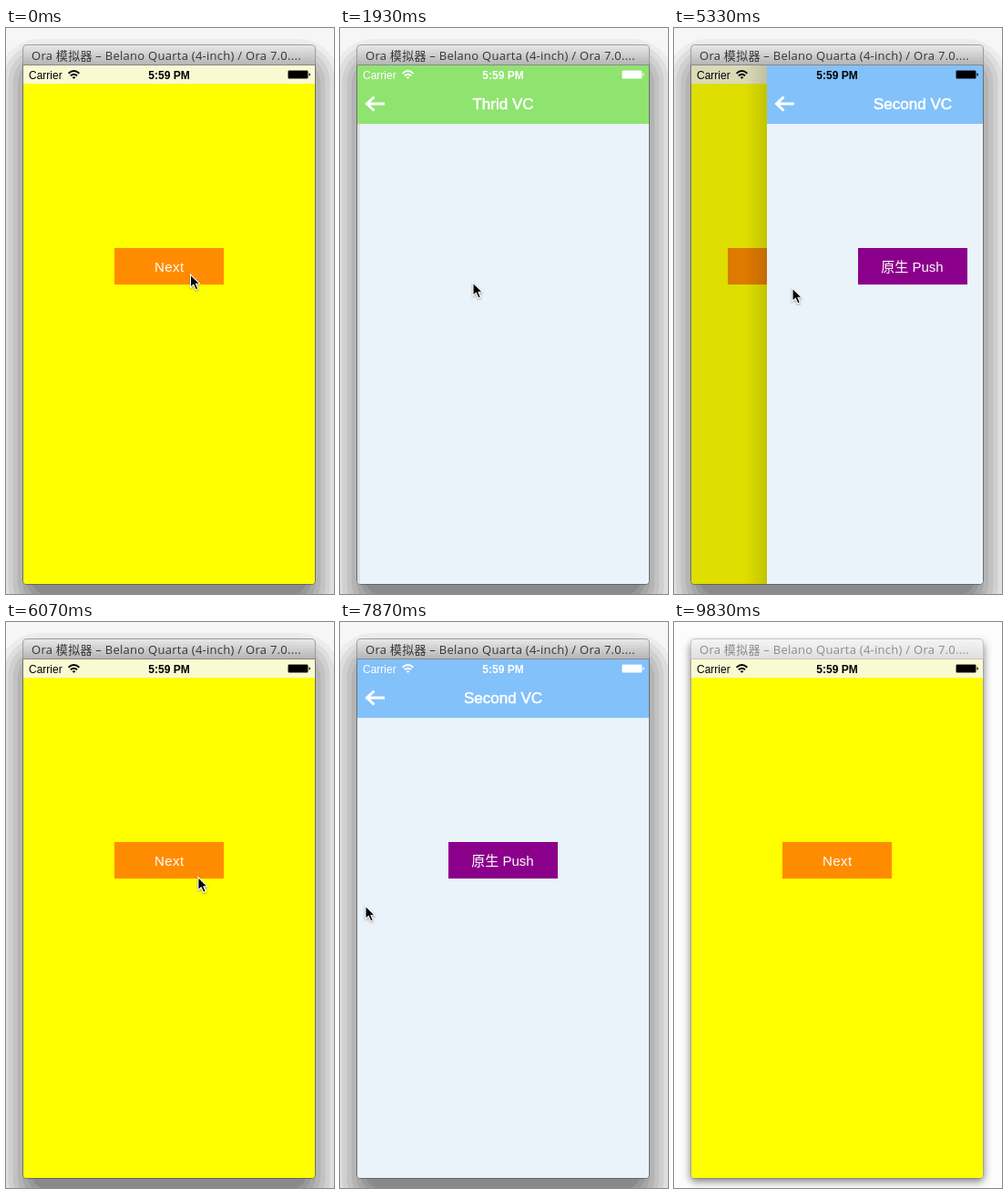
An HTML page for the animation above (9920 ms loop, 360x620 px).

```html
<!DOCTYPE html>
<html lang="zh">
<head>
<meta charset="utf-8">
<title>Navigation demo</title>
<style>
  html, body { margin: 0; width: 100%; height: 100%; overflow: hidden; background: #f6f6f6; }
  svg { display: block; width: 360px; height: 620px; }
  text { font-family: "Liberation Sans", Arial, "Noto Sans CJK SC", "Noto Sans CJK", sans-serif; white-space: pre; }
  .mid { text-anchor: middle; }
  .caption { font: 13px "Open Sans", "Noto Sans", "Noto Sans CJK SC", "Noto Sans CJK", sans-serif; letter-spacing: .27px; fill: #363636; }
  .button { font-size: 15px; fill: #fff; }
  .title { font-size: 17px; fill: #fff; stroke: #fff; stroke-width: .55px; }
  .status { font-size: 12px; fill: currentColor; }
  #soft { display: none; }
  .idle #soft { display: inline; }
  .idle #rings { display: none; }
  .idle .caption { fill: #8c8c8c; }
  .idle #chrome { fill: url(#offFill); stroke: #bdbdbd; }
  .idle #outline { stroke-opacity: .2; }
</style>
</head>
<body>
<svg id="stage" viewBox="0 0 360 620">
  <defs>
    <linearGradient id="onFill" x2="0" y2="1">
      <stop stop-color="#e9e9e9"/><stop offset="1" stop-color="#b3b3b3"/>
    </linearGradient>
    <linearGradient id="offFill" x2="0" y2="1">
      <stop stop-color="#f5f5f5"/><stop offset="1" stop-color="#dedede"/>
    </linearGradient>
    <linearGradient id="edge">
      <stop stop-opacity="0"/><stop offset="1" stop-opacity=".16"/>
    </linearGradient>
    <clipPath id="screen">
      <path d="M19 41H339V606Q339 609 336 609H22Q19 609 19 606Z"/>
    </clipPath>
    <filter id="blur" x="-10%" y="-10%" width="120%" height="120%">
      <feGaussianBlur stdDeviation="4.5"/>
    </filter>
  </defs>

  <rect id="backdrop" width="360" height="620"/>
  <g id="rings"></g>
  <rect id="soft" x="18" y="23" width="322" height="590" rx="5" fill-opacity=".5" filter="url(#blur)"/>

  <!-- window frame -->
  <path id="chrome" d="M18.5 41V23Q18.5 18.5 23 18.5H335Q339.5 18.5 339.5 23V41Z" fill="url(#onFill)" stroke="#8e8e8e" stroke-width=".8"/>
  <path id="outline" d="M18.5 41V605.5Q18.5 609.5 22.5 609.5H335.5Q339.5 609.5 339.5 605.5V41Z" fill="none" stroke="#555" stroke-opacity=".7"/>
  <text class="caption" x="28" y="35">Ora 模拟器 – Belano Quarta (4-inch) / Ora 7.0....</text>

  <g clip-path="url(#screen)">
    <g id="home">
      <rect x="19" y="41" width="320" height="568" fill="#ff0"/>
      <rect x="19" y="41" width="320" height="20" fill="#fafad2"/>
      <rect x="119" y="241" width="120" height="40" fill="#ff8c00"/>
      <text class="button mid" x="179.3" y="266.5" letter-spacing=".5">Next</text>
    </g>
    <rect id="homeDim" x="19" y="41" width="320" height="568"/>

    <g id="page">
      <rect id="pageEdge" x="-5" y="41" width="24" height="568" fill="url(#edge)"/>
      <g id="second">
        <rect x="19" y="105" width="320" height="504" fill="#eaf2fa"/>
        <rect x="119" y="241" width="120" height="40" fill="#8b008b"/>
        <text class="button mid" x="178.5" y="266.5">原生 Push</text>
      </g>
      <rect id="secondDim" x="19" y="105" width="320" height="504"/>
      <g id="third">
        <rect x="19" y="105" width="320" height="504" fill="#eaf2fa"/>
      </g>
      <rect x="19" y="41" width="320" height="64" fill="#82c1fa"/>
      <rect id="green" x="19" y="41" width="320" height="64" fill="#8fe36f"/>
      <path d="M49 83H30M37.5 75.5L29.5 83L37.5 90.5" fill="none" stroke="#fff" stroke-width="3"/>
      <text id="titleB" class="title mid" x="179" y="89">Second VC</text>
      <text id="titleC" class="title mid" x="179" y="89">Thrid VC</text>
    </g>

    <g id="status">
      <text class="status" x="25" y="55.5">Carrier</text>
      <g fill="none" stroke="currentColor" stroke-width="1.9">
        <path d="M68.6 49.7Q74.5 44.3 80.4 49.7M70.9 52.3Q74.5 49 78.1 52.3"/>
        <path d="M74.5 55.8L72.6 53.9Q74.5 52.4 76.4 53.9Z" fill="currentColor" stroke="none"/>
      </g>
      <text class="status mid" x="179" y="55.5" font-weight="bold">5:59 PM</text>
      <rect x="309.5" y="46.5" width="22" height="9" rx="1.5" fill="none" stroke="currentColor" stroke-opacity=".45"/>
      <rect x="310" y="47" width="21" height="8" rx=".6" fill="currentColor"/>
      <path d="M332.5 49.2Q334 49.7 334 51T332.5 52.8Z" fill="currentColor"/>
    </g>
  </g>

  <path id="cursor" d="M0 0V14.2L3.3 11.2L5.8 16.8L8.4 15.7L6 10.2H10.2Z" stroke="#fff" stroke-width="1.1" style="filter:drop-shadow(0 1px 1px rgba(0,0,0,.35))"/>
</svg>

<script>
const LOOP = 9920;
const WIDTH = 320;
const STEP = 148;
const PUSH = 590;
const FINISH = 220;
const PARALLAX = -.253;
const $ = id => document.getElementById(id);

// Stretches of time in which the picture updates about every STEP ms.
const runs = [
  [590, 1180], [1480, 2380], [2530, 3560], [3710, 4740],
  [4890, 5920], [6070, 6970], [7120, 8020], [8170, 9070]
];
const HIDE_POINTER = 9220;
const LOSE_FOCUS = 9830;

// Pointer stops: time, x, y.
const stops = [
  [0, 202.5, 270], [1400, 176, 264], [1930, 146, 279], [2380, 13, 284], [2530, 13, 284],
  [3340, 266, 264], [3860, 171, 259], [4400, 34, 77], [4890, 47, 278], [5330, 130, 285],
  [5700, 222, 286], [6500, 198, 272], [6820, 198, 290], [7570, 20, 310], [7870, 28, 311],
  [8470, 228, 312], [9070, 306, 593]
];

// A page is pushed in, later grabbed by the pointer, dragged and let go.
const pageVisits = [
  { push: 590, drag: 4890, grabX: 47, release: 5700 },
  { push: 6530, drag: 7800, grabX: 28, release: 8480 }
];
const thirdVisits = [{ push: 1410, drag: 2530, grabX: 19, release: 3340 }];

// Share of the way still to go in an ease-out.
const left = x => (1 - Math.min(1, x)) ** 2.2;

function pointer(t) {
  const i = stops.findIndex(stop => stop[0] > t);
  if (i < 0) return stops[stops.length - 1].slice(1);
  const [t0, x0, y0] = stops[i - 1], [t1, x1, y1] = stops[i];
  const k = (t - t0) / (t1 - t0);
  return [x0 + (x1 - x0) * k, y0 + (y1 - y0) * k];
}

function offset(visits, t) {
  const visit = visits.filter(v => v.push <= t).pop();
  if (!visit) return WIDTH;
  const { push, drag, grabX, release } = visit;
  if (t < drag) return WIDTH * left((t - push) / PUSH);
  const pulled = Math.max(0, pointer(Math.min(t, release))[0] - grabX);
  return t < release ? pulled : WIDTH - (WIDTH - pulled) * left((t - release) / FINISH);
}

// Time of the latest picture update.
function snap(t) {
  if (t >= LOSE_FOCUS) return LOSE_FOCUS;
  if (t >= HIDE_POINTER) return HIDE_POINTER;
  const run = runs.filter(r => r[0] <= t).pop();
  if (!run) return 0;
  const [from, to] = run;
  const step = (to - from) / Math.round((to - from) / STEP);
  // Updates fall on whole hundredths of a second.
  const at = i => Math.round((from + i * step) / 10) * 10;
  let i = 0;
  while (at(i + 1) <= Math.min(t, to)) i++;
  return at(i);
}

function move(id, x, y = 0) {
  $(id).setAttribute("transform", `translate(${x} ${y})`);
}

function fade(id, value) {
  $(id).setAttribute("opacity", value);
}

// Stepped window shadow: nested rounded bands, darker inwards.
function drawRings() {
  for (let i = 0; i < 8; i++) {
    const d = 26 - i * 5.2;
    const gray = 236 - i * 14;
    const box = {
      x: 18 - d, y: 38 - d, width: 322 + 2 * d, height: 593 + 2 * d,
      rx: 24 + d * .8, fill: `rgb(${gray},${gray},${gray})`
    };
    const band = document.createElementNS("http://www.w3.org/2000/svg", "rect");
    for (const name in box) band.setAttribute(name, box[name]);
    $("rings").append(band);
  }
}

function draw(t) {
  const page = offset(pageVisits, t);
  const third = offset(thirdVisits, t);
  const cover = 1 - page / WIDTH;
  const push = 1 - third / WIDTH;
  const bar = Math.min(1, push * 1.05);
  const idle = t >= LOSE_FOCUS;

  move("home", PARALLAX * (WIDTH - page));
  fade("homeDim", .177 * cover);
  move("page", page);
  fade("pageEdge", cover);

  move("second", PARALLAX * (WIDTH - third));
  fade("secondDim", .08 * push);
  move("third", third);
  fade("green", bar);
  fade("titleB", 1 - bar);
  fade("titleC", bar);
  move("titleB", -60 * bar);
  move("titleC", 110 * (1 - bar));

  $("status").setAttribute("color", page > 0 ? "#000" : "#fff");
  move("cursor", ...pointer(t));
  fade("cursor", t < HIDE_POINTER ? 1 : 0);
  $("stage").classList.toggle("idle", idle);
  $("backdrop").setAttribute("fill", idle ? "#fcfcfc" : "#f6f6f6");
}

const start = performance.now();
function loop() {
  draw(snap((performance.now() - start) % LOOP));
  requestAnimationFrame(loop);
}
drawRings();
draw(0);
requestAnimationFrame(loop);
</script>
</body>
</html>
```
